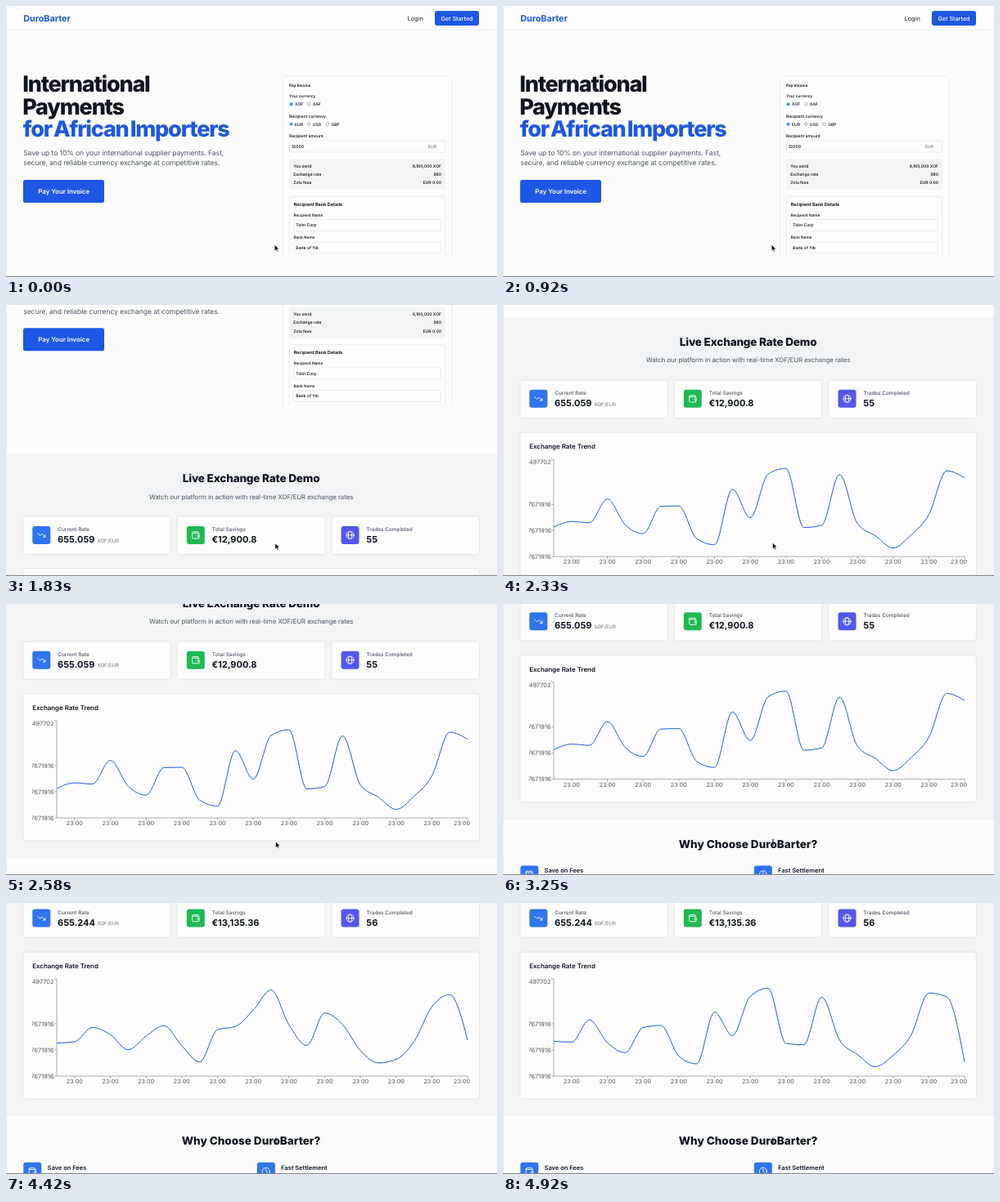
Animation of 600 by 332 pixels, one loop 5 s. Source, as an HTML page:

```html
<!DOCTYPE html>
<html lang="en">
<head>
<meta charset="utf-8">
<title>DuroBarter</title>
<style>
  html, body { margin: 0; width: 100%; height: 100%; overflow: hidden; background: #fcfcfd; }
  svg { display: block; width: 600px; height: 332px; }
  text {
    font-family: Inter, Roboto, sans-serif;
    font-optical-sizing: none;
    text-rendering: geometricPrecision;
    white-space: pre;
  }
  .title { word-spacing: -2.5px; }
  .icon { fill: none; stroke: #fff; stroke-width: 2; stroke-linecap: round; stroke-linejoin: round; }
  .card { fill: #fdfdfd; filter: drop-shadow(0 .6px .8px rgba(0, 0, 0, .13)); }
  .axis { fill: none; stroke: #777; stroke-width: .6; }
</style>
</head>
<body>
<svg id="stage" viewBox="0 0 600 332"></svg>
<script>
const LOOP = 5000, FPS = 12;
const BLUE = '#1d57e3', INK = '#0f1420', GRAY = '#4b5563', LINE = '#e4e6ea';

const ICONS = {
  trend: '<path d="M22 17l-8.5-8.5-5 5L2 7M16 17h6v-6"/>',
  wallet: '<path d="M19 7V4a1 1 0 0 0-1-1H5a2 2 0 0 0 0 4h15a1 1 0 0 1 1 1v4h-3a2 2 0 0 0 0 4h3a1 1 0 0 0 1-1v-2a1 1 0 0 0-1-1M3 5v14a2 2 0 0 0 2 2h15a1 1 0 0 0 1-1v-4"/>',
  globe: '<circle cx="12" cy="12" r="10"/><ellipse cx="12" cy="12" rx="4.5" ry="10"/><path d="M2 12h20"/>',
  clock: '<circle cx="12" cy="12" r="10"/><path d="M12 6v6l4 2"/>'
};

const text = (x, y, str, size, { fill = INK, weight = 400, anchor = 'start', spacing = 0, id = '' } = {}) =>
  `<text ${id && `id="${id}"`} x="${x}" y="${y}" font-size="${size}" fill="${fill}" font-weight="${weight}" ` +
  `text-anchor="${anchor}" letter-spacing="${spacing}">${str}</text>`;

const formText = (x, y, str, size, options) => text(x, y, str, size, { weight: 500, fill: '#000', ...options });

const rect = (x, y, w, h, fill, rx = 0, extra = '') =>
  `<rect x="${x}" y="${y}" width="${w}" height="${h}" fill="${fill}" rx="${rx}" ${extra}/>`;

const box = (x, y, w, h, rx = 1.5) => rect(x, y, w, h, '#fdfdfd', rx, `stroke="${LINE}" stroke-width=".7"`);

const card = (x, y, w, h) => rect(x, y, w, h, '#fdfdfd', 3, 'class="card"');

const iconTile = (x, y, color, name) => rect(x, y, 22, 22, color, 3) +
  `<g class="icon" transform="translate(${x + 5.5} ${y + 5.5}) scale(.458)">${ICONS[name]}</g>`;

const radio = (x, y, label, on) =>
  `<circle cx="${x}" cy="${y}" r="1.9" fill="#fff" stroke="${on ? '#2f74f0' : '#777'}" stroke-width=".6"/>` +
  (on ? `<circle cx="${x}" cy="${y}" r="1.3" fill="#2f74f0"/>` : '') +
  formText(x + 4.6, y + 1.8, label, 5);

function header() {
  return rect(0, 0, 600, 29, '#fdfdfd') + rect(0, 28.8, 600, .8, LINE) +
    text(21.3, 18.9, 'DuroBarter', 10.8, { fill: BLUE, weight: 700, spacing: -.05 }) +
    text(490.5, 17.7, 'Login', 7.3, { fill: '#374151', weight: 500 }) +
    rect(524, 6, 54, 18, BLUE, 3) +
    text(551, 17.7, 'Get Started', 7.2, { fill: '#fff', weight: 500, anchor: 'middle' });
}

function hero() {
  const title = { weight: 800, spacing: -1.2 };
  const lead = { fill: GRAY, spacing: -.085 };
  return '<g class="title">' +
    text(20.2, 105.4, 'International', 27, title) +
    text(20.2, 132.9, 'Payments', 27, title) +
    text(20.8, 160.4, 'for African Importers', 27, { ...title, fill: BLUE }) + '</g>' +
    text(21.2, 182.5, 'Save up to 10% on your international supplier payments. Fast,', 8.6, lead) +
    text(21.2, 195.3, 'secure, and reliable currency exchange at competitive rates.', 8.6, lead) +
    rect(21, 213, 99, 28, BLUE, 2.5) +
    text(70.7, 230, 'Pay Your Invoice', 7.95, { fill: '#fff', weight: 600, anchor: 'middle', spacing: -.05 });
}

function invoiceForm() {
  const rows = [['You send', '8,160,000 XOF'], ['Exchange rate', '680'], ['Zolu fees', 'EUR 0.00']];
  return `<g clip-path="url(#formClip)">` +
    rect(306, 82, 271, 226, '#fbfbfc') + box(338.3, 86.3, 206.5, 260, 4) +
    formText(346, 98.8, 'Pay Invoice', 4.75, { weight: 600 }) +
    formText(346, 112.2, 'Your currency', 4.8) +
    radio(348.5, 120.2, 'XOF', true) + radio(370.2, 120.2, 'XAF') +
    formText(346, 136.6, 'Recipient currency', 5) +
    radio(348.5, 144.7, 'EUR', true) + radio(370.2, 144.7, 'USD') + radio(392.6, 144.7, 'GBP') +
    formText(346, 161, 'Recipient amount', 5) +
    box(346.3, 165, 190.5, 14) + formText(349, 173.8, '12000', 5.1) +
    formText(516, 173.6, 'EUR', 5, { fill: '#6b7280' }) +
    rect(346, 187, 191, 38.5, '#f3f5f4', 2) +
    rows.map(([name, value], i) => formText(351.2, 197.7 + i * 10.3, name, 5) +
      formText(532, 197.7 + i * 10.3, value, 5.05, { anchor: 'end' })).join('') +
    box(346.3, 233.3, 190.5, 110, 2) +
    formText(351.5, 245, 'Recipient Bank Details', 5.55, { weight: 600 }) +
    formText(351.5, 257.6, 'Recipient Name', 4.75) +
    box(351.3, 261.5, 180, 14) + formText(354.3, 270.2, 'Tolm Corp', 5.1) +
    formText(351.5, 285.2, 'Bank Name', 4.75) +
    box(351.3, 289, 180, 14) + formText(354.3, 297.8, 'Bank of Yib', 5.1) + '</g>';
}

function stats() {
  const items = [
    [21.3, '#2f74f0', 'trend', 'Current Rate', 'rate'],
    [209.8, '#1fb954', 'wallet', 'Total Savings', 'savings'],
    [398.5, '#5457ec', 'globe', 'Trades Completed', 'trades']
  ];
  return items.map(([x, color, icon, label, id]) => card(x, 444.5, 179.4, 45.2) +
    iconTile(x + 11, 455.6, color, icon) +
    text(x + 42, 461.8, label, 6.4, { fill: GRAY, weight: 500 }) +
    text(x + 41.8, 475.5, '', 11, { weight: 700, id })).join('') +
    text(111.5, 475.4, 'XOF/EUR', 6.1, { fill: '#6b7280' });
}

const X0 = 62, STEP = 21.83, BASE = 660;

function chart() {
  const axisLabel = { fill: '#555' };
  const yTicks = [[541, 547, '655.1497702'], [596, 598.6, '655.7671916'], [628, 630.6, '655.7671916'], [660, 662.6, '655.7671916']];
  let ticks = '', labels = '';
  for (const [y, base, label] of yTicks) {
    ticks += `M${X0 - 3} ${y}h3`;
    labels += text(58.5, base, label, 7.4, { ...axisLabel, anchor: 'end' });
  }
  for (let i = 1; i <= 23; i += 2) {
    const x = X0 + i * STEP;
    ticks += `M${x} ${BASE}v3`;
    labels += text(Math.min(x, 557), 668.9, '23:00', 7.2, { ...axisLabel, anchor: 'middle' });
  }
  return card(21.3, 508.4, 556.6, 179) +
    text(32.2, 528.2, 'Exchange Rate Trend', 7.9, { weight: 600 }) +
    `<g clip-path="url(#chartClip)">${labels}<path class="axis" d="M${X0} 541V${BASE}H564.5${ticks}"/>` +
    `<path id="line" fill="none" stroke="${BLUE}" stroke-width="1"/></g>`;
}

function demo() {
  const mid = { anchor: 'middle' };
  return rect(0, 366.5, 600, 342.7, '#f3f4f6') +
    text(299.6, 402, 'Live Exchange Rate Demo', 13.5, { ...mid, weight: 800, spacing: -.15 }) +
    text(299.6, 422.3, 'Watch our platform in action with real-time XOF/EUR exchange rates', 7.9,
      { ...mid, fill: GRAY, spacing: -.08 }) +
    stats() + chart();
}

function features() {
  const label = { weight: 600 };
  return text(299.6, 744.3, 'Why Choose DuroBarter?', 13.5, { weight: 800, anchor: 'middle' }) +
    iconTile(21.3, 765.8, '#2f74f0', 'wallet') + text(50.5, 774.6, 'Save on Fees', 7.5, label) +
    iconTile(306.8, 765.8, '#2f74f0', 'clock') + text(336, 774.6, 'Fast Settlement', 7.5, label);
}

document.getElementById('stage').innerHTML = `
  <defs>
    <clipPath id="formClip"><rect x="300" y="80" width="300" height="227.7"/></clipPath>
    <clipPath id="chartClip"><rect x="32" y="535" width="540" height="140"/></clipPath>
  </defs>
  ${rect(0, 0, 600, 332, '#fcfcfd')}
  <g id="page">${header()}${hero()}${invoiceForm()}${demo()}${features()}</g>
  ${rect(0, 0, .6, 332, '#e3e3e5')}${rect(0, 331, 600, 1, '#858585')}
  <path id="arrow" d="M0 0V7.4L1.7 5.9L2.8 8.4L4 7.9L2.9 5.4H5.2Z" fill="#000" stroke="#fff" stroke-width=".5"/>
  <path id="beam" d="M-1.4 -4Q0 -4 0 -3V3Q0 4 -1.4 4M1.4 -4Q0 -4 0 -3V3Q0 4 1.4 4" fill="none" stroke="#222" stroke-width=".7"
    transform="translate(330 292)"/>`;

const [page, line, arrow, beam, rate, savings, trades] =
  ['page', 'line', 'arrow', 'beam', 'rate', 'savings', 'trades'].map(id => document.getElementById(id));

// Line heights on the page; the last one arrives with the update.
const series = [226.5, 219.5, 221, 192, 223.5, 234.5, 201, 200.5, 240.5, 248, 180, 215, 161.5,
  154.5, 227, 224, 162, 222, 237, 252, 236, 211, 157.5, 166, 250.5].map(y => y + 397.5);
const UPDATE = 3875, MORPH = 1500;

// CSS "ease" timing curve
function ease(x) {
  if (x <= 0 || x >= 1) return Math.min(1, Math.max(0, x));
  const bezier = (s, a, b) => 3 * (1 - s) ** 2 * s * a + 3 * (1 - s) * s * s * b + s ** 3;
  let low = 0, high = 1;
  for (let i = 0; i < 20; i++) {
    const s = (low + high) / 2;
    if (bezier(s, .25, .25) < x) low = s; else high = s;
  }
  return bezier(low, .1, 1);
}

// Monotone cubic through evenly spaced points
function monotonePath(ys) {
  const slopes = ys.slice(1).map((y, i) => (y - ys[i]) / STEP);
  const last = slopes.length;
  const tangents = ys.map((_, i) => {
    const a = slopes[i - 1], b = slopes[i];
    if (i === 0 || i === last) return 0;
    return (Math.sign(a) + Math.sign(b)) * Math.min(Math.abs(a), Math.abs(b), Math.abs(a + b) / 4);
  });
  tangents[0] = (3 * slopes[0] - tangents[1]) / 2;
  tangents[last] = (3 * slopes[last - 1] - tangents[last - 1]) / 2;
  const d = STEP / 3;
  return ys.map((y, i) => {
    const x = X0 + i * STEP;
    return i ? `C${x - 2 * d} ${ys[i - 1] + tangents[i - 1] * d} ${x - d} ${y - tangents[i] * d} ${x} ${y}` : `M${x} ${y}`;
  }).join('');
}

// A swipe that picks up speed, then coasts to rest
function scrollAt(t) {
  const start = 1500, release = 1833, rest = 3700;
  if (t < 1420) return 0;
  if (t < start) return 2.3 * ((t - 1420) / 80) ** 2;
  if (t < release) {
    const span = release - start, u = (t - start) / span;
    const blend = u * u * (3 - 2 * u);
    return 2.3 + 182.2 * blend + span * (.2 * u * (1 - u) ** 2 - .456 * u * u * (1 - u));
  }
  return 448 - 263.5 * Math.max(0, 1 - (t - release) / (rest - release)) ** 3.23;
}

function draw(t) {
  const scroll = scrollAt(t);
  page.setAttribute('transform', `translate(0 ${-scroll})`);

  const p = ease((t - UPDATE) / MORPH);
  line.setAttribute('d', monotonePath(series.slice(0, -1).map((y, i) => y + (series[i + 1] - y) * p)));

  const updated = t >= UPDATE;
  rate.textContent = updated ? '655.244' : '655.059';
  savings.textContent = updated ? '€13,135.36' : '€12,900.8';
  trades.textContent = updated ? '56' : '55';

  const overHeading = scroll > 440;
  arrow.style.display = overHeading ? 'none' : '';
  beam.style.display = overHeading ? '' : 'none';
  arrow.setAttribute('transform', `translate(${328.3 + Math.min(1.3, scroll / 300)} ${292.5 - scroll / 300})`);
}

const began = performance.now();
function tick() {
  const t = (performance.now() - began) % LOOP;
  // The picture advances at a steady 12 frames per second.
  draw(Math.floor((t + 5) * FPS / 1000) % (LOOP * FPS / 1000) * 1000 / FPS);
  requestAnimationFrame(tick);
}
tick();
</script>
</body>
</html>
```
